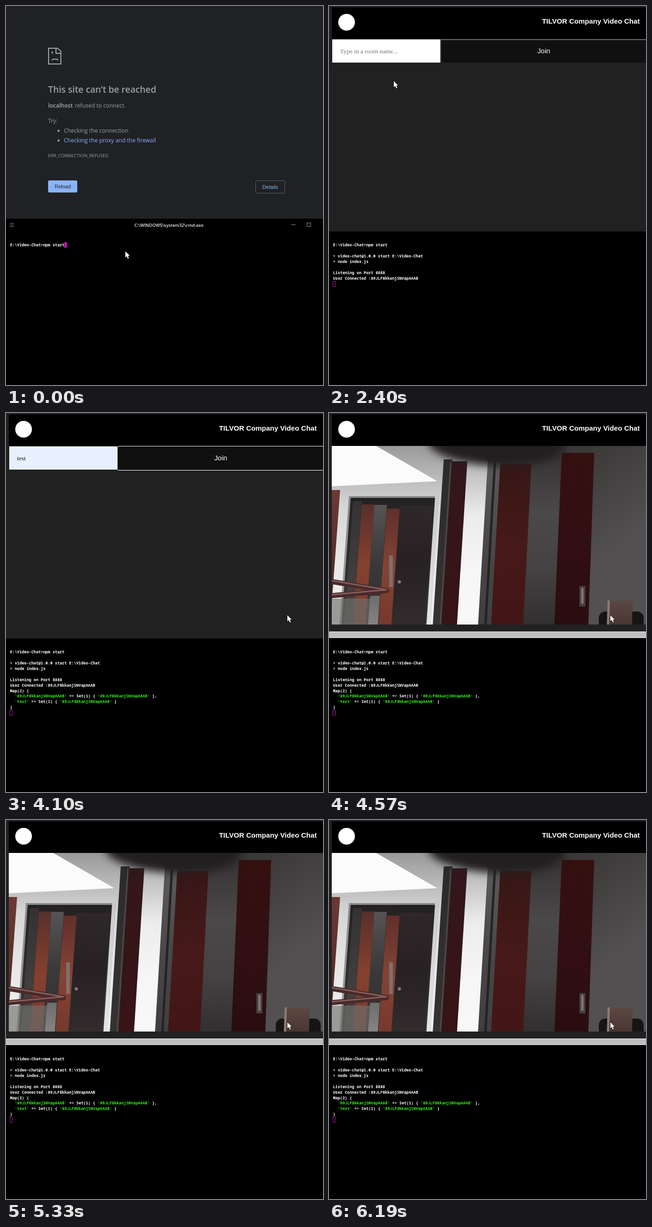
An HTML page with a canvas for the animation above (6.28 s loop, 685 by 817 pixels).

```html
<!DOCTYPE html>
<html lang="en">
<head>
<meta charset="utf-8">
<title>Video chat start</title>
<style>
  html, body { margin: 0; width: 100%; height: 100%; overflow: hidden; background: #000; }
  canvas { display: block; }
</style>
</head>
<body>
<canvas id="stage" width="685" height="817"></canvas>
<script>
const W = 685, H = 817, LOOP = 6280;
const SANS = '"Open Sans", "Noto Sans", sans-serif';
const ARIAL = '"Liberation Sans", Arial, sans-serif';
const SERIF = '"Liberation Serif", "Times New Roman", serif';
const MONO = '"Noto Sans Mono", "DejaVu Sans Mono", monospace';
const GREEN = '#30f014', BLUE = '#8ab4f8', GREY = '#9aa0a6', MAGENTA = '#c414bc';
const ID = '89JLF8kkanjSNVapAAAB';

// Moments at which the picture changes hard
const AT = { run: 60, output: 140, listen: 690, blink: 1390, page: 1860,
             user: 2020, fill: 2950, join: 3800, map: 3950, video: 4250 };

// Terminal lines with the moment each block appears
const LOG = [
  [0, 'E:\\Video-Chat>npm start'],
  [AT.output, '', '> video-chat@1.0.0 start E:\\Video-Chat', '> node index.js', ''],
  [AT.listen, 'Listening on Port 8888'],
  [AT.user, 'User Connected :' + ID],
  [AT.map, 'Map(2) {', `  '${ID}' => Set(1) { '${ID}' },`, `  'test' => Set(1) { '${ID}' }`, '}']
];

// Pointer moves: from, until, and where it comes to rest
const HOME = [258, 529];
const MOVES = [
  [AT.run, 520, 247, 553],
  [AT.blink, 1700, 118, 388],
  [AT.page, 2400, 140, 162],
  [2480, 3170, 84, 120],
  [3270, 3580, 444, 100],
  [AT.join, 4100, 608, 436]
];

const stage = document.getElementById('stage').getContext('2d');
let g = stage;

function box(x, y, w, h, color) {
  g.fillStyle = color;
  g.fillRect(x, y, w, h);
}

function text(s, x, y, font, color, align = 'left') {
  g.font = font;
  g.fillStyle = color;
  g.textAlign = align;
  g.fillText(s, x, y);
}

function round(x, y, w, h, r, fill, stroke) {
  g.beginPath();
  g.roundRect(x, y, w, h, r);
  if (fill) { g.fillStyle = fill; g.fill(); }
  if (stroke) { g.strokeStyle = stroke; g.lineWidth = 1; g.stroke(); }
}

function disc(x, y, r, color) {
  round(x - r, y - r, 2 * r, 2 * r, r, color);
}

function trace(pts) {
  g.beginPath();
  for (let i = 0; i < pts.length; i += 2) g.lineTo(pts[i], pts[i + 1]);
}

function line(pts, color, width) {
  trace(pts);
  g.strokeStyle = color;
  g.lineWidth = width;
  g.stroke();
}

// Colours spread evenly from top to bottom
function shade(top, bottom, colors) {
  const fill = g.createLinearGradient(0, top, 0, bottom);
  colors.forEach((c, i) => fill.addColorStop(i / Math.max(1, colors.length - 1), c));
  return fill;
}

function sadFile() {
  const c = '#a8abae';
  line([111, 91, 92, 91, 92, 125, 118.5, 125, 118.5, 97, 111, 91], c, 2);
  line([108, 91, 108, 102, 118, 102], c, 2);
  line([100, 98, 100, 102.5], c, 2.5);
  line([99, 117, 102, 114.5, 110, 114.5, 113, 117], c, 2);
}

function errorPage() {
  const body = '12.2px ' + SANS;
  box(0, 0, W, 457, '#202124');
  sadFile();
  text('This site can’t be reached', 91, 187, '600 19.3px ' + SANS, GREY);
  text('localhost', 91, 219, '600 12.2px ' + SANS, '#a6abb0');
  text('refused to connect.', 149, 219, body, GREY);
  text('Try:', 91, 252, body, GREY);
  disc(113.5, 269, 2.3, GREY);
  text('Checking the connection', 125, 273, body, GREY);
  disc(113.5, 290, 2.3, GREY);
  text('Checking the proxy and the firewall', 125, 294, body, BLUE);
  text('ERR_CONNECTION_REFUSED', 91, 326, '9.75px ' + SANS, GREY);
  round(91, 376, 63, 26, 3, BLUE);
  text('Reload', 122.5, 393, '11.1px ' + ARIAL, '#202124', 'center');
  round(539.5, 376.5, 63, 27, 3, null, '#5f6368');
  text('Details', 571, 394, '11.1px ' + ARIAL, BLUE, 'center');
}

function titleBar(title) {
  box(0, 457, W, 1, '#303134');
  for (let i = 0; i < 3; i++) box(8, 468 + 3.5 * i, 9, 1, '#8c8c8c');
  text(title, 352, 476, '600 9.5px ' + SANS, '#f2f2f2', 'center');
  box(616, 471, 10, 1, '#9a9a9a');
  round(650.5, 467.5, 8, 8, 0, null, '#9a9a9a');
}

function joinForm(t) {
  const filled = t >= AT.fill;
  box(7, 72, 233, 50, filled ? '#e8f0fe' : '#fff');
  text(filled ? 'test' : 'Type in a room name...', 24, 102, '13.5px ' + SERIF,
       filled ? '#111' : '#757575');
  box(241, 72, W - 241, 50, '#101010');
  if (t >= AT.join) round(240.5, 71.5, W, 52, 3, null, '#fff');
  else line([241, 122, 241, 72.5, W, 72.5], '#858585', 1.5);
  text('Join', 464, 102, '15.3px ' + ARIAL, '#fff', 'center');
}

function appPage(t) {
  box(0, 0, W, 486, '#212121');
  box(6, 3, W, 68, '#000');
  disc(38, 35, 18, '#fff');
  text('TILVOR Company Video Chat', 671.5, 38, 'bold 15.2px ' + ARIAL, '#fff', 'right');
  if (t < AT.video) return joinForm(t);
  g.drawImage(video, 0, 0);
  box(0, 471, W, 15, '#000');
  box(0, 471, W, 14, '#f4f4f4');
  box(0, 472, W, 12, '#bebebe');
}

// Upright panel down to the lower edge; the lens leans it more on the left
function slab(x, w, top, ...colors) {
  const foot = e => e - 0.074 * (1 - (e / 780) ** 2) * (456 - top);
  trace([x, top, x + w, top, foot(x + w), 456, foot(x), 456]);
  g.fillStyle = shade(top, 456, colors);
  g.fill();
}

function room() {
  box(6, 71, W, 385, shade(71, 456, ['#9a9a9a', '#d6d6d6', '#e8e8e8', '#eeeeee']));
  trace([6, 71, 102, 71, 234, 147, 6, 158]);
  g.fillStyle = '#fbfbfb';
  g.fill();
  const wall = g.createLinearGradient(560, 71, W, 250);
  wall.addColorStop(0, '#3b3838');
  wall.addColorStop(1, '#525050');
  box(340, 71, W, 385, wall);
  slab(0, 24, 166, '#6b3a33', '#4c2623');
}

function farDoor() {
  slab(43, 194, 179, '#8a8a8a', '#a0a0a0');
  slab(229, 8, 176, '#c8c8c8', '#e6e6e6');
  slab(47, 182, 183, '#232122', '#3a3637');
  slab(52, 19, 190, '#353233', '#4a4444');
  slab(71, 27, 197, '#57302b', '#84402f', '#7c3c30');
  slab(98, 27, 198, '#555354', '#3a3839', '#302e2f');
  slab(125, 28, 206, '#60302a', '#844335', '#77392d');
  slab(153, 72, 200, '#2f282a', '#272123', '#322c2d');
  box(130, 307, 8, 68, '#80706c');
  disc(152, 364, 3.5, '#85777f');
}

function railing() {
  box(6, 400, 88, 56, 'rgba(110,112,110,.65)');
  slab(89, 21, 394, '#6e6c6c', '#858383');
  g.lineCap = g.lineJoin = 'round';
  const tube = [4, 363, 124, 383, 4, 394];
  line(tube, '#4a2a2a', 11);
  line(tube.map((v, i) => v - 2 * (i % 2)), '#86605d', 3);
}

function nearDoor() {
  slab(248, 19, 100, '#2c2a2b', '#353233');
  slab(262, 3, 104, '#4c4849');
  slab(266, 34, 104, '#33171a', '#38131 6'.replace(' ', ''));
  slab(299, 45, 102, '#b4b4b4', '#ececec', '#f6f6f6', '#f8f8f8');
  slab(343, 28, 106, '#5c5a5b', '#494748', '#403e3f');
  slab(356, 5, 107, '#242223');
  slab(370, 69, 110, '#361716', '#47191a', '#431616');
  slab(438, 66, 95, '#383536', '#4a4849', '#444243', '#322f30');
  slab(503, 70, 86, '#34100f', '#320f12', '#2a0d10');
  box(541, 373, 13, 44, '#484041');
  box(545, 377, 5, 34, '#80767 4'.replace(' ', ''));
}

function chair() {
  round(583, 428, 97, 50, 14, '#171415');
  slab(602, 54, 405, '#5c4741', '#4a3733');
  slab(602, 5, 404, '#8b7a75');
}

// Still camera view, drawn once
function drawVideo() {
  const c = document.createElement('canvas');
  c.width = W;
  c.height = H;
  g = c.getContext('2d');
  g.rect(6, 71, W, 385);
  g.clip();
  room();
  farDoor();
  railing();
  nearDoor();
  chair();
  // Out of focus shape at the top edge
  g.filter = 'blur(9px)';
  g.beginPath();
  g.ellipse(362, 66, 148, 48, 0.04, 0, 7);
  g.fillStyle = '#231f20';
  g.fill();
  g = stage;
  return c;
}

function row(i) {
  return 518 + i * 11.93;
}

// Quoted strings are green; all characters share one pitch
function print(i, s) {
  let col = 0;
  for (const part of s.split(/('[^']*')/)) {
    text(part, 8.7 + col * 5.12, row(i), '600 8.53px ' + MONO, part[0] === "'" ? GREEN : '#fff');
    col += part.length;
  }
}

function terminal(t) {
  box(0, 457, W, H - 457, '#000');
  const lines = LOG.filter(([from]) => t >= from).flatMap(([, ...rows]) => rows);
  lines.forEach((s, i) => print(i, s));
  const y = Math.round(row(lines.length)) - 9;
  if (t < AT.run) box(126, 509, 5.5, 12, MAGENTA);
  else if (t >= AT.page) round(8.5, y + 0.5, 5, 11, 0, null, MAGENTA);
  else if (t >= AT.blink) box(8.5, y, 5.5, 12, MAGENTA);
}

function pointer(t) {
  let [x, y] = HOME;
  for (const [from, until, toX, toY] of MOVES) {
    const k = Math.min(1, Math.max(0, (t - from) / (until - from)));
    const ease = k * k * (3 - 2 * k);
    x += (toX - x) * ease;
    y += (toY - y) * ease;
  }
  g.save();
  g.translate(Math.round(x), Math.round(y));
  trace([0, 0, 0, 13, 3, 10.3, 5.3, 15.5, 7.5, 14.5, 5.3, 9.5, 9.3, 9.3]);
  g.closePath();
  g.strokeStyle = '#111';
  g.lineWidth = 1.4;
  g.stroke();
  g.fillStyle = '#fff';
  g.fill();
  g.restore();
}

const video = drawVideo();
const start = performance.now();

function draw() {
  const t = (performance.now() - start) % LOOP;
  terminal(t);
  if (t < AT.page) {
    errorPage();
    titleBar(t < AT.run ? 'C:\\WINDOWS\\system32\\cmd.exe' : 'npm');
  } else {
    appPage(t);
  }
  pointer(t);
  requestAnimationFrame(draw);
}
draw();
</script>
</body>
</html>
```
